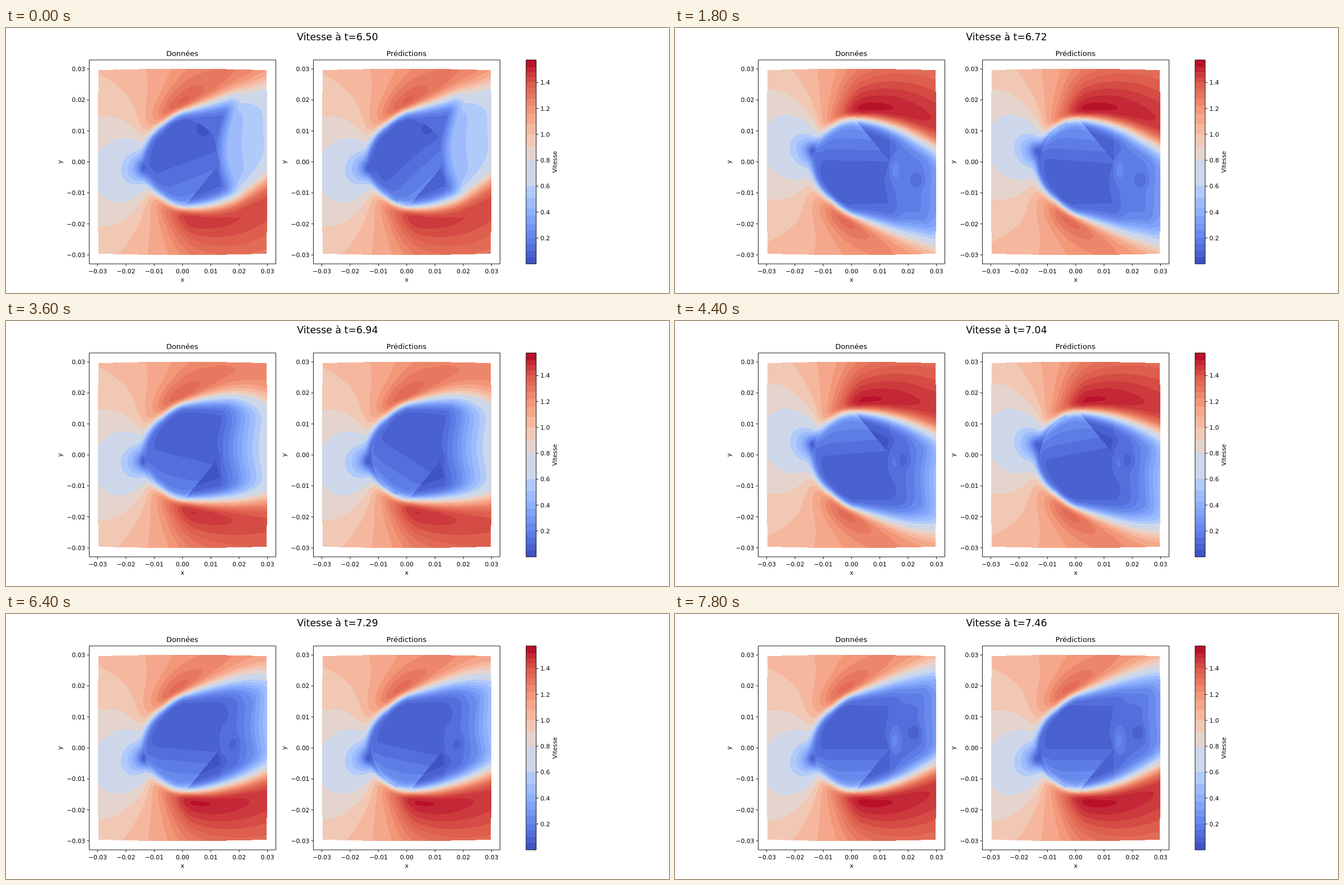
An HTML page with a canvas that plays this animation: 1183 by 473 pixels, repeating every 8 s.

```html
<!DOCTYPE html>
<html lang="fr">
<head>
<meta charset="utf-8">
<style>
  html, body { margin: 0; width: 100%; height: 100%; overflow: hidden; background: #fff; }
  canvas, svg { position: absolute; left: 0; top: 0; width: 1183px; height: 473px; }
  text { font-family: "DejaVu Sans", sans-serif; font-size: 10.8px; fill: #000; }
  .mid { text-anchor: middle; }
  .end { text-anchor: end; }
  .line { fill: none; stroke: #000; stroke-width: 0.9; }
</style>
</head>
<body>
<canvas id="field" width="1183" height="473"></canvas>
<svg id="plot" viewBox="0 0 1183 473"></svg>
<script>
const STEP = 200, STEPS = 40, VMAX = 1.575;
const SX = 50.5, SY = 55.3, CY = 239;
const TAU = 2 * Math.PI;
const field = document.getElementById('field').getContext('2d');
const plot = document.getElementById('plot');

// ---------- colours ----------
const STOPS = [[59,76,192],[98,130,234],[141,176,254],[184,208,249],[221,221,221],
  [245,196,173],[244,154,123],[222,96,77],[180,4,38]];
const EDGES = [0,.05,.1,.15,.2,.26,.31,.37,.43,.51,.6,.8,.91,1,1.08,1.16,1.22,
  1.27,1.32,1.36,1.4,1.44,1.48,1.52,VMAX];

function colour(t) {
  const s = Math.min(Math.max(t, 0), 1) * 8, i = Math.min(7, Math.floor(s));
  return STOPS[i].map((c, n) => Math.round(c + (STOPS[i + 1][n] - c) * (s - i)));
}

const BANDS = EDGES.slice(1).map((hi, i) => {
  const lo = EDGES[i];
  return { lo, hi, rgb: colour((lo + hi) / 2 / VMAX) };
});
const LUT = Array.from({ length: 1576 }, (_, n) => {
  const [r, g, b] = (BANDS.find(k => n / 1000 < k.hi) || BANDS[BANDS.length - 1]).rgb;
  return (255 << 24 | b << 16 | g << 8 | r) >>> 0;
});

// ---------- flow ----------
const wave = (q, at) => Math.cos(TAU * (q - at));
const bell = (a, b) => Math.exp(-a * a - b * b);
const logistic = z => 1 / (1 + Math.exp(-z));
const smooth = (a, b, x) => {
  const t = Math.min(1, Math.max(0, (x - a) / (b - a)));
  return t * t * (3 - 2 * t);
};

function lerpAt(xs, ys, x) {
  if (x <= xs[0]) return ys[0];
  for (let i = 1; i < xs.length; i++) {
    if (x < xs[i]) return ys[i - 1] + (ys[i] - ys[i - 1]) * (x - xs[i - 1]) / (xs[i] - xs[i - 1]);
  }
  return ys[ys.length - 1];
}

// Wake speed along x, and tilt of the inner bands, through half a shedding cycle.
const PHASES = [-.098, 0, .046, .16, .22, .402];
const WAKE_X = [1.2, 1.7, 2.4, 3];
const WAKE = [
  [.07, .07, .09, .1, .1, .07],
  [.2, .1, .13, .36, .45, .2],
  [.45, .22, .14, .38, .55, .45],
  [.7, .45, .27, .34, .62, .7]
];
const TILT = [-.6, -.2, 0, .5, .9, .6];

// Height of the shear layer above the axis.
function edge(x, q) {
  const mean = 92 - 3.2 * (x - 1.4) ** 2;
  const amp = 9 + 9 * x + 3.4 * x * x;
  return (mean + amp * wave(q, .05 + .027 * x)) / SY;
}

function flow(phase, fitted) {
  let q = ((phase + .098) % 1 + 1) % 1 - .098, flip = 1;
  if (q >= .402) { q -= .5; flip = -1; }
  const ramp = WAKE.map(row => lerpAt(PHASES, row, q));
  const tilt = lerpAt(PHASES, TILT, q) * (fitted ? 1 : .4);
  const lean = wave(q, .07);
  const nose = -.36 * wave(q, .06);
  const power = [.5 + .5 * wave(q, .55), .5 + .5 * wave(q, .05)];
  const spot = Math.exp(-(((q - .035) / .05) ** 2));
  const late = smooth(.08, .16, q) * (1 - smooth(.25, .38, q));

  function inside(x, y, mid, half) {
    const r = Math.hypot(x, y);
    const body = r < 1.37 && x - .9 * y < 1.36 && x + .27 * y < 1.31;
    if (body) {
      if (fitted && r > 1.25 && x < -.3) return .05;
      const w = -(y - tilt * x) * lean;
      const dark = late * .05 * bell((x - .75) / .35, (y - 1.05) / .35);
      return .095 + (w > 0 ? .14 : .035) * w - dark;
    }
    const n = Math.min(1, Math.abs((y - mid) / half));
    let v = lerpAt(WAKE_X, ramp, x - .7 * n * n + .1);
    if (x < 1.35 && y < 0) v -= .03;
    if (spot > .01) {
      v -= spot * .09 * bell((x - 1.8 - 9 * q) / .25, (y - .16 - 7 * q) / .25);
      v += spot * .1 * bell((x - 1.52) / .2, (y - .22) / .42);
    }
    return v;
  }

  return function column(x) {
    const ex = Math.max(x, -.7);
    const tops = [edge(ex, q), edge(ex, q + .5)];
    const mid = (tops[0] - tops[1]) / 2, half = (tops[0] + tops[1]) / 2;
    const front = Math.max(0, (.1 - x) / 1.52);
    const soft = power.map(p => .07 + (.07 - .02 * p) * Math.max(0, x));
    const shift = nose * (1 - smooth(-1.5, -.3, x)) * (1 + .6 * smooth(-1.4, -3, x));
    const dx = x + .68, grow = smooth(-1, .4, x), reach = 1.5 + .4 * Math.max(0, x);

    // Signed distance outside the wake on one side.
    function gap(y, top) {
      if (front === 0) return y - top;
      const h = Math.max(0, y);
      return (Math.hypot(front, h / top) - 1) * (1.5 + (top - 1.5) * Math.min(1, h));
    }

    return function speed(yUp) {
      const y = yUp * flip, h = Math.abs(y);
      const up = gap(y, tops[0]), down = gap(-y, tops[1]);
      const d = Math.max(up, down);
      const a = logistic(up / soft[0]), b = logistic(down / soft[1]);
      const mix = front > 0 ? Math.max(a, b) : a + b - a * b;
      const core = mix < .999 ? inside(x, y, mid, half) : 0;
      if (mix < .001) return core;
      const dy = y - shift, r2 = dx * dx + dy * dy + .001;
      const p = power[1] + (power[0] - power[1]) * smooth(mid - .6, mid + .6, y);
      let out = 1.1 * Math.min(1.4, Math.sqrt(Math.max(0, 1 + (1.36 * dx + .4624) / r2)));
      out += p * .24 * grow * Math.exp(-((d / reach) ** 2));
      out += .12 * (1 - p) * bell((x + .7 - .8 * (h - 1.5)) / .8, (h - 1.7) / .8);
      return core + (out - core) * mix;
    };
  };
}

const W = 306, H = 336, TOP = 71;
function paint(left, phase, fitted) {
  const img = field.createImageData(W, H), px = new Uint32Array(img.data.buffer);
  const column = flow(phase, fitted);
  for (let i = 0; i < W; i++) {
    const x = (i + .5 - 153) / SX, speed = column(x);
    const tall = 3.005 - .045 * (x / 3) ** 2;
    for (let j = 0; j < H; j++) {
      const y = (CY - TOP - j - .5) / SY;
      if (Math.abs(y) > tall || Math.abs(x) > 3 - .035 * (y / 3) ** 2) continue;
      const v = Math.min(VMAX, Math.max(0, speed(y)));
      px[j * W + i] = LUT[Math.floor(v * 1000)];
    }
  }
  field.putImageData(img, left, TOP);
}

// ---------- axes ----------
const parts = [];
const text = (x, y, s, cls, more = '') =>
  parts.push(`<text x="${x}" y="${y}" class="${cls}" ${more}>${s}</text>`);
const path = d => parts.push(`<path class="line" d="${d}"/>`);
const turned = (x, y, s) => text(0, 0, s, 'mid', `transform="translate(${x} ${y}) rotate(-90)"`);
const label = k => (k < 0 ? '\u2212' : '') + (Math.abs(k) / 100).toFixed(2);

function axes(x0, mid, title) {
  path(`M${x0} 57H${x0 + 333}V421H${x0}Z`);
  for (let k = -3; k <= 3; k++) {
    const x = mid + k * SX, y = CY - k * SY;
    path(`M${x} 421v4M${x0} ${y}h-4`);
    text(x, 437.5, label(k), 'mid');
    text(x0 - 7, Math.round(y + 4), label(k), 'end');
  }
  text(mid, 50, title, 'mid', 'style="font-size:13px" dx="-.5"');
  text(mid, 453, 'x', 'mid');
  turned(x0 - 48.5, CY, 'y');
}

axes(148.5, 315, 'Données');
axes(548.5, 715, 'Prédictions');

const barY = v => 421 - v * 364 / VMAX;
for (const { lo, hi, rgb } of BANDS) {
  parts.push(`<rect x="928" y="${barY(hi)}" width="18" height="${barY(lo) - barY(hi)}"
    fill="rgb(${rgb})" shape-rendering="crispEdges"/>`);
}
path('M928 57H946V421H928Z');
for (let k = 1; k <= 7; k++) {
  const y = barY(k / 5);
  path(`M946 ${y}h4`);
  text(953.5, Math.round(y + 4), (k / 5).toFixed(1), '');
}
turned(983, CY, 'Vitesse');
text(591.5, 22, '', 'mid', 'id="clock" style="font-size:17.4px"');
plot.innerHTML = parts.join('');
const clock = document.getElementById('clock');

// ---------- playback ----------
let shown = -1;
function draw(now) {
  const i = Math.floor(now / STEP) % STEPS;
  if (i !== shown) {
    shown = i;
    const phase = (i - 32) * .1495;
    paint(162, phase, false);
    paint(562, phase, true);
    clock.textContent = 'Vitesse à t=' + (6.504 + .0245 * i).toFixed(2);
  }
  requestAnimationFrame(draw);
}
draw(0);
</script>
</body>
</html>
```
